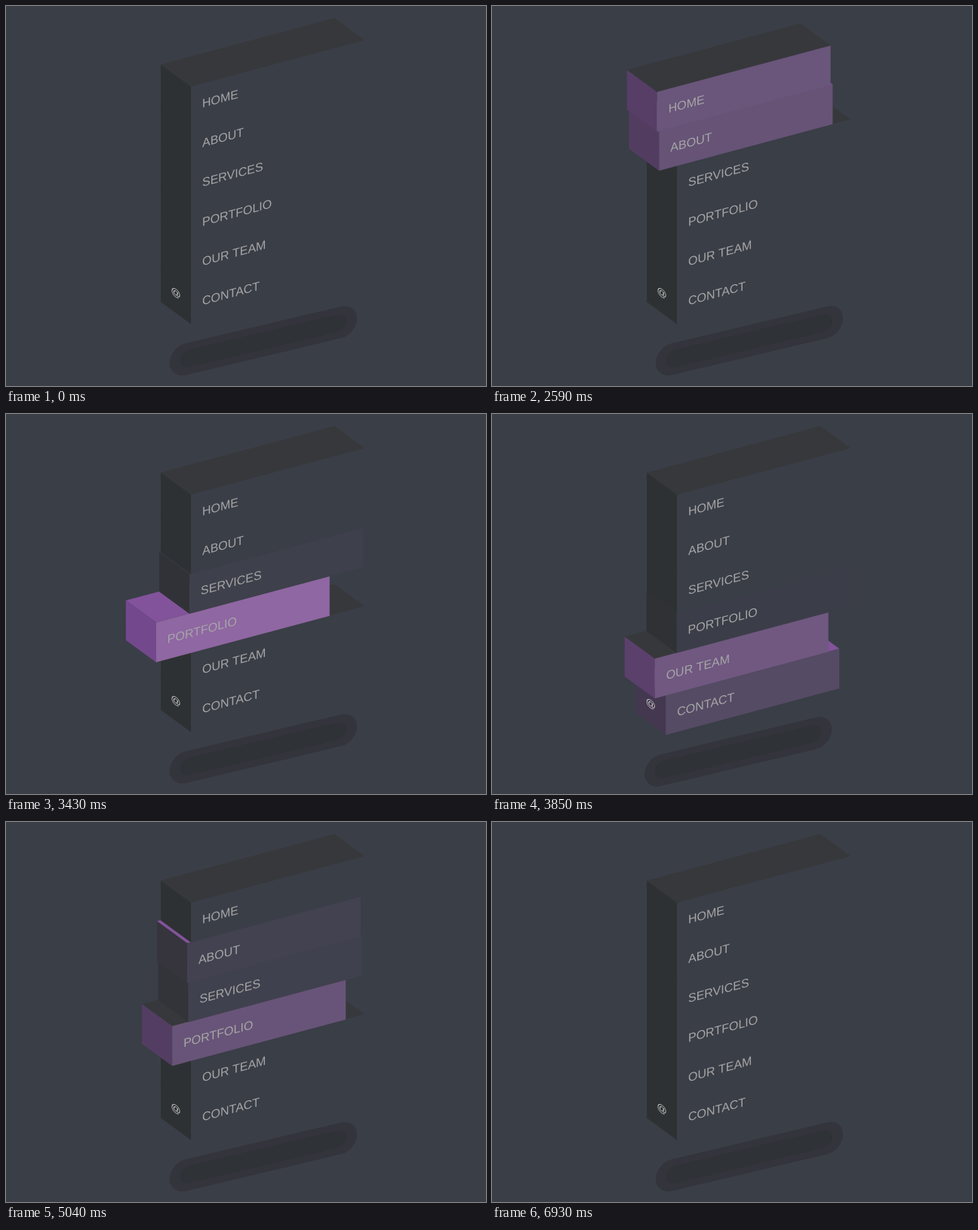
An HTML page with a canvas for the animation above (7 s loop, 636x504 px).

```html
<!DOCTYPE html>
<html lang="en">
<head>
<meta charset="utf-8">
<title>Isometric menu</title>
<style>
  html, body { margin: 0; width: 100%; height: 100%; overflow: hidden; background: #3a3e47; }
  canvas { display: block; }
</style>
</head>
<body>
<canvas id="stage" width="636" height="504"></canvas>
<script>
const ctx = document.getElementById('stage').getContext('2d');
const LOOP = 7000, STEP = 70, FADE = 500;
const WIDTH = 230, ROW = 52.4, DEPTH = 40, SLIDE = 50;
const SLOPE = -Math.tan(Math.PI / 12);
const LABELS = ['HOME', 'ABOUT', 'SERVICES', 'PORTFOLIO', 'OUR TEAM', 'CONTACT'];

const PAGE = [58, 62, 71];
const FRONT_HOT = [150, 106, 170];
const SIDE = [46, 49, 51];
const SIDE_HOT = [122, 74, 148];
const TOP = [55, 56, 59];
const TOP_HOT = [130, 83, 155];

// Moments at which the pointer enters a row; -1 is outside the menu.
const POINTER = [
  [1889, 0], [2450, 1], [2790, 2], [3098, 3], [3440, 4], [3750, 5],
  [4300, 4], [4499, 3], [4899, 2], [4988, 1], [5180, 0], [5828, 1], [5900, -1]
];
const VISITS = POINTER.slice(0, -1).map(([start, row], i) =>
  ({ row, start, end: POINTER[i + 1][0] }));

const bezier = (a, b, s) => 3 * a * s * (1 - s) ** 2 + 3 * b * s * s * (1 - s) + s ** 3;

// The CSS "ease" curve.
function ease(x) {
  if (x <= 0) return 0;
  if (x >= 1) return 1;
  let low = 0, high = 1;
  for (let i = 0; i < 24; i++) {
    const mid = (low + high) / 2;
    if (bezier(0.25, 0.25, mid) < x) low = mid; else high = mid;
  }
  return bezier(0.1, 1, low);
}

function rowState(row, t) {
  const visit = VISITS.filter(v => v.row === row && v.start <= t).pop();
  if (!visit) return { amount: 0, hot: false };
  if (t < visit.end) return { amount: ease((t - visit.start) / FADE), hot: true };
  // An interrupted slide returns in proportionally less time.
  const peak = ease((visit.end - visit.start) / FADE);
  return { amount: peak * (1 - ease((t - visit.end) / (FADE * peak))), hot: false };
}

const rgb = c => `rgb(${c.map(Math.round).join()})`;
const mix = (a, b, k) => rgb(a.map((v, i) => v + (b[i] - v) * k));

function within(matrix, draw) {
  ctx.save();
  ctx.transform(...matrix);
  draw();
  ctx.restore();
}

function box(color, x, y, w, h) {
  ctx.fillStyle = color;
  ctx.fillRect(x, y, w, h);
}

function pill(color, w, h) {
  ctx.strokeStyle = color;
  ctx.lineWidth = h;
  ctx.lineCap = 'round';
  ctx.beginPath();
  ctx.moveTo((h - w) / 2, 0);
  ctx.lineTo((w - h) / 2, 0);
  ctx.stroke();
}

function drawShadow(shift) {
  within([1, 0.03, 0, 1, 96 - shift, 362.7], () => {
    pill('#33343c', 248, 42);
    pill('#2f3236', 220, 23);
  });
}

function drawRow(row, { amount, hot }) {
  const last = row === LABELS.length - 1;
  within([1, 0, 0, 1, -SLIDE * amount, row * ROW], () => {
    within([1, 0, 1, 1, 0, 0], () =>
      box(rgb(hot ? TOP_HOT : TOP), 0, -DEPTH, WIDTH, DEPTH));
    within([1, 1, 0, 1, 0, 0], () => {
      box(mix(SIDE, SIDE_HOT, amount), -DEPTH, 0, DEPTH, ROW + 0.3);
      if (last) {
        ctx.fillStyle = '#c4c4c4';
        ctx.font = '13px "Liberation Sans", Arial, sans-serif';
        ctx.textAlign = 'center';
        ctx.fillText('@', -DEPTH / 2, 30.3);
      }
    });
    box(mix(PAGE, FRONT_HOT, amount), 0, 0, WIDTH, ROW + 0.3);
    ctx.fillStyle = '#a6a6a6';
    ctx.font = '16px "Liberation Sans", Arial, sans-serif';
    ctx.textAlign = 'left';
    ctx.fillText(LABELS[row], 15, 31.8);
  });
}

function render(t) {
  box(rgb(PAGE), 0, 0, 636, 504);
  const states = LABELS.map((_, row) => rowState(row, t));
  within([1, SLOPE, 0, 1, 245, 107], () => {
    drawShadow(SLIDE * states[5].amount);
    for (let row = LABELS.length - 1; row >= 0; row--) drawRow(row, states[row]);
  });
}

const origin = performance.now();
function tick() {
  const t = (performance.now() - origin) % LOOP;
  render(Math.floor(t / STEP) * STEP);
  requestAnimationFrame(tick);
}
tick();
</script>
</body>
</html>
```
